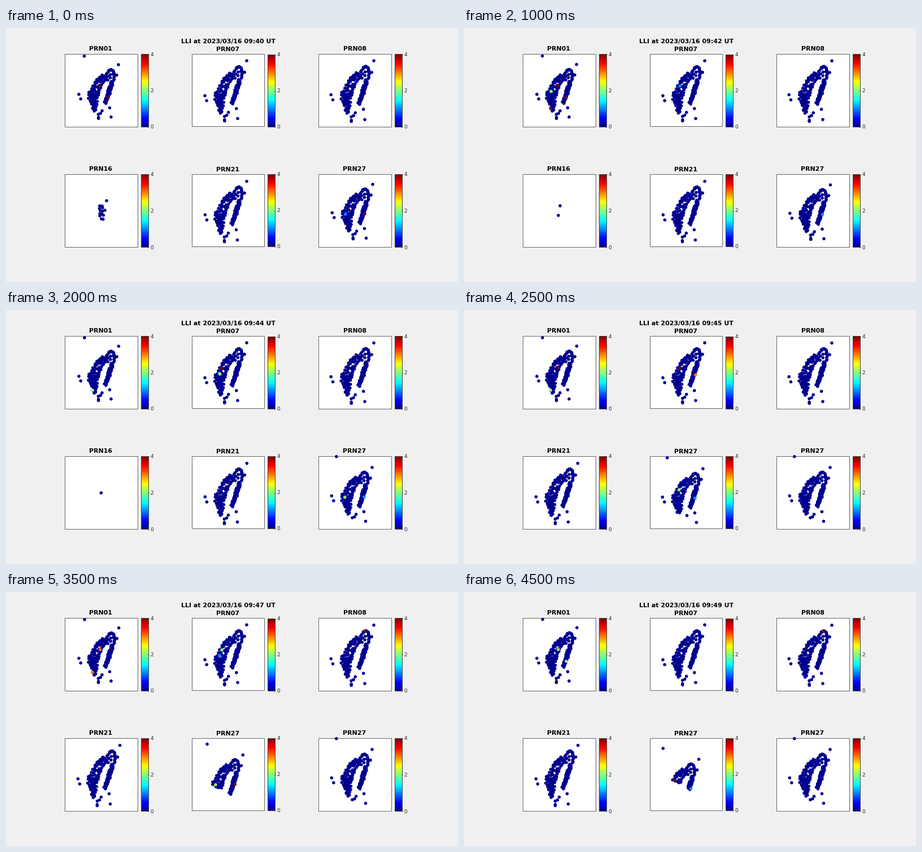
A matplotlib script for the animation above (5000 ms loop, 800x450 px).

```python
import numpy as np
import matplotlib.pyplot as plt
from matplotlib.animation import FuncAnimation

W, H, DPI = 800, 450, 100
PX = 72 / DPI
FRAMES, STEP = 10, 500
CORNERS = [(x, y) for y in (46, 259) for x in (104, 329, 553)]
plt.rcParams["font.family"] = "DejaVu Sans"


def jet(n=64):
    i = np.arange(1, n + 1)
    ramp = lambda lo, hi: np.clip(np.minimum(i - lo, hi - i) / 16, 0, 1)
    return np.column_stack([ramp(24, 72), ramp(8, 56), ramp(-8, 40)])


JET = jet()
rng = np.random.default_rng(11)


# Station map, in pixels from the corner of a panel
def along(path, t):
    path = np.array(path, float)
    s = np.linspace(0, 1, len(path))
    return np.column_stack([np.interp(t, s, c) for c in path.T])


def band(left, right, n, gap=2.7):
    """Scatter up to n points between two paths, none closer than gap."""
    t, v = rng.random((2, 40 * n))
    cand = along(left, t) * (1 - v[:, None]) + along(right, t) * v[:, None]
    kept = []
    for p in cand:
        if len(kept) < n and all(np.hypot(*(p - q)) > gap for q in kept):
            kept.append(p)
    return np.array(kept)


ISLES = [(97, 13), (23, 72), (80, 116), (26, 81), (35.5, -3.2), (93, 33.5),
         (78, 98), (57, 111), (57, 117), (57, 119), (64, 104), (61, 109)]
HOT = [(47, 99), (53, 56), (49, 66), (62, 55), (76, 78), (80, 70), (46, 73), (82, 23)]
STATIONS = np.vstack([
    ISLES,
    band([(67, 31), (56, 42), (47, 56), (41, 68), (39, 82), (45, 93), (49, 105)],
         [(75, 37), (71, 46), (64, 57), (62, 73), (56, 80), (57, 91), (54, 103)], 76),
    band([(74, 32), (78, 25), (83, 22), (88, 26), (89, 35), (88, 45)],
         [(75, 33), (79, 27), (83, 24), (86, 27), (87, 36), (87, 46)], 18, 2.2),
    band([(70, 36), (84, 30)], [(74, 47), (84, 38)], 10, 4),
    band([(82, 46), (77, 59), (73, 73), (68, 87)],
         [(87, 48), (82, 62), (77, 76), (71, 91)], 36, 2.4),
    HOT,
])
BASE = np.column_stack([ISLES[:3], np.ones(3)])
HOMOG = np.column_stack([STATIONS, np.ones(len(STATIONS))])

# Where the first three isles appear, and the drift of the northern one per step
VIEWS = {
    "PRN01": ([(95, 19), (25, 71.5), (82, 111.7)], (0.1, -0.2)),
    "PRN07": ([(97, 12), (23, 74), (81, 114.4)], (0, 0.03)),
    "PRN08": ([(98, 12), (22.2, 72.2), (82, 116.2)], (0, 0.1)),
    "PRN21": ([(97, 12.7), (23.4, 72), (80.5, 116.6)], (0.08, 0)),
    "PRN27": ([(96, 18), (24.3, 68.3), (84.5, 113.3)], (0, 0)),
}
# Stations that lose lock, and how often
SLIPS = {
    "PRN01": ([0, 2, 3, 4], 0.5),
    "PRN07": ([1, 2, 5], 0.5),
    "PRN08": ([7], 0.3),
    "PRN27": ([1, 5, 6], 0.4),
}

# Setting satellite: stations thin out towards the last two
FADING = np.vstack([[(74, 47), (71, 64)],
                    band([(58, 55), (61, 68), (62, 79)], [(67, 55), (72, 68), (68, 80)], 12, 3)])


def fading(f):
    n = round(14 / 2.7 ** f + 0.3)
    pts = FADING[:max(n, 1)] + (-10 * (1 - 0.45 ** f), 4.5 * f)
    return pts, np.zeros(len(pts), int)


def levels(name, f):
    out = np.zeros(len(STATIONS), int)
    sites, rate = SLIPS.get(name, ([], 0))
    dice = np.random.default_rng([int(name[3:]), f])
    for k in sites:
        if dice.random() < rate:
            out[k - len(HOT)] = dice.integers(1, 5)
    return out


def view(name, f, stale=False):
    if name == "PRN16":
        return fading(f)
    anchors, north = VIEWS[name]
    anchors = np.array(anchors, float)
    anchors[0] += np.multiply(north, f)
    pts = HOMOG @ np.linalg.solve(BASE, anchors)
    lv = np.zeros(len(pts), int) if stale else levels(name, f)
    seen = np.ones(len(pts), bool)
    if name == "PRN27":
        late = max(f - 4.5, 0)
        pts = pts + (-0.25 * f - 1.6 * late, 0.5 * f + 3.3 * late)
        seen = pts[:, 1] < 110 - 5 * f + 0.56 * (pts[:, 0] - 22)
    seen &= pts[:, 1] >= 0
    return pts[seen], lv[seen]


def slots(f):
    """Satellite, step and staleness of each panel."""
    low = ["PRN16", "PRN21", "PRN27"] if f < 5 else ["PRN21", "PRN27"]
    out = [(name, f, False) for name in ["PRN01", "PRN07", "PRN08"] + low]
    return out if f < 5 else out + [("PRN27", 4, True)]


fig = plt.figure(figsize=(W / DPI, H / DPI), dpi=DPI, facecolor="#f0f0f0")
ax = fig.add_axes([0, 0, 1, 1])
ax.axis("off")


def box(x, y, w, h, face, edge, z):
    ax.add_patch(plt.Rectangle((x + 0.5, y + 0.5), w, h, fc=face, ec=edge,
                               lw=PX, zorder=z, snap=False))


def heading(x, y):
    return ax.text(x, y, "", size=11 * PX, weight="bold", ha="center",
                   va="baseline", color="black")


names = []
for k, (x, y) in enumerate(CORNERS):
    mid = k % 3 == 1
    size = 129 - mid
    box(x, y, size, size, "white", "#666666", 1)
    bx, by = x + 135 - mid, y + (k == 1)
    ax.imshow(JET[::-1, None, :], extent=(bx + 0.5, bx + 13.5, by + size + 0.5, by + 0.5),
              aspect="auto", interpolation="nearest", zorder=1)
    box(bx, by, 13, size, "none", "#444444", 2)
    for v in (0, 2, 4):
        ty = by + size * (1 - v / 4) + 0.5
        ax.plot([bx + 12, bx + 13.5], [ty, ty], color="#262626", lw=0.5 * PX, zorder=3)
        ax.text(bx + 16.4, ty + 3, str(v), size=9 * PX, color="#262626", va="baseline")
    names.append(heading(x + size / 2 - 0.5, y - 6 + mid))

title = heading(393.2, 27)
dots = ax.scatter([], [], s=(5.6 * PX) ** 2, linewidths=0, zorder=4)
ax.set_xlim(0, W)
ax.set_ylim(H, 0)


def draw(f):
    title.set_text(f"LLI at 2023/03/16 09:{40 + f} UT")
    pts, lv = [], []
    for slot, label, corner in zip(slots(f), names, CORNERS):
        label.set_text(slot[0])
        p, v = view(*slot)
        pts.append(p + corner)
        lv.append(v)
    dots.set_offsets(np.vstack(pts))
    dots.set_facecolors(JET[np.minimum(np.concatenate(lv) * 16, 63)])
    return [title, dots, *names]


anim = FuncAnimation(fig, draw, frames=FRAMES, init_func=lambda: draw(0),
                     interval=STEP, repeat=True, repeat_delay=0, blit=False)
plt.show()
```
